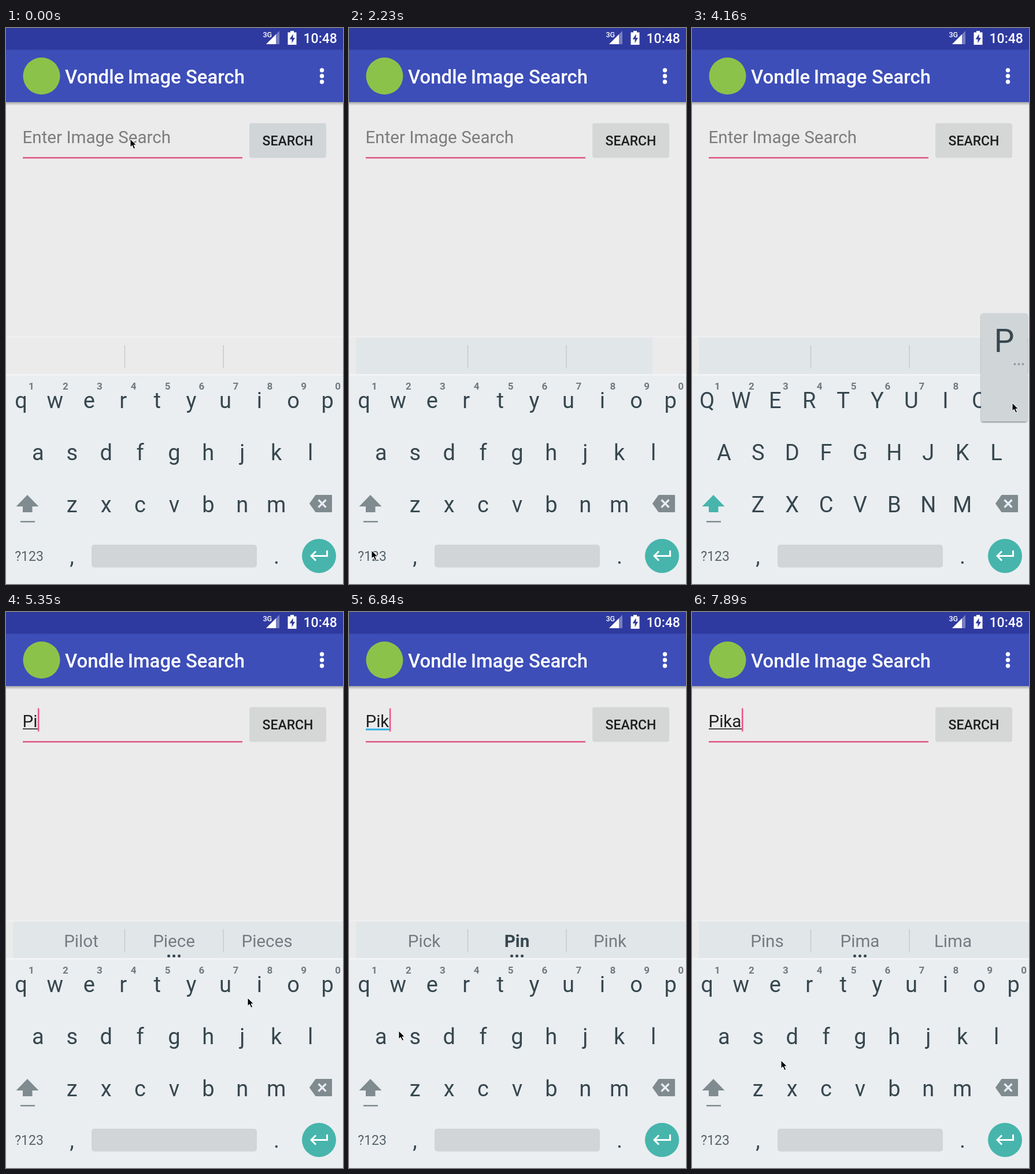
Animation, 583 px wide and 961 px high, one loop 8000 ms. Source, as an HTML page:

```html
<!DOCTYPE html>
<html lang="en">
<head>
<meta charset="utf-8">
<title>Image search</title>
<style>
  html, body { margin: 0; width: 100%; height: 100%; overflow: hidden; background: #ebebeb; }
  svg { display: block; width: 100vw; height: 100vh; font-family: Roboto, sans-serif; }
  .mid { text-anchor: middle; }
  .med { font-weight: 500; }
  .key { font-size: 38px; fill: #37474f; text-anchor: middle; }
  .hint { font-size: 17px; font-weight: 700; fill: #70797e; text-anchor: middle; }
  .word { font-size: 29.6px; fill: #737d82; text-anchor: middle; }
  .bold { font-weight: 700; fill: #37474f; }
</style>
</head>
<body>
<svg viewBox="0 0 583 961" xmlns="http://www.w3.org/2000/svg">
  <defs>
    <linearGradient id="fade" x2="0" y2="1">
      <stop stop-color="#000" stop-opacity=".3"/>
      <stop offset="1" stop-color="#000" stop-opacity="0"/>
    </linearGradient>
    <filter id="soft" x="-10%" y="-10%" width="120%" height="120%">
      <feDropShadow dx="0" dy="1.5" stdDeviation="1.3" flood-opacity=".45"/>
    </filter>
  </defs>
  <rect width="583" height="961" fill="#ebebeb"/>

  <!-- status and app bars -->
  <rect y="128" width="583" height="6" fill="url(#fade)"/>
  <rect width="583" height="128" fill="#3d4eb8"/>
  <rect width="583" height="37.5" fill="#2f3aa0"/>
  <g fill="#fff">
    <text class="med" x="444.5" y="16" font-size="12.5">3G</text>
    <path d="M473 5V28H450Z" opacity=".35"/>
    <path d="M467 11V28H450Z"/>
    <path d="M492 5h6v2.5h4.5V29h-15V7.500h4.500Z"/>
    <path d="M496.500 10.500L490.500 19.500H494.500V26L500 17H496.500Z" fill="#2f3aa0"/>
    <text class="med" x="514.500" y="26" font-size="23">10:48</text>
    <text class="med" x="102" y="96" font-size="32.900">Vondle</text>
    <text class="med" x="413" y="96" font-size="32.900" text-anchor="end">Image Search</text>
    <circle cx="546.500" cy="73" r="3.700"/>
    <circle cx="546.500" cy="83" r="3.700"/>
    <circle cx="546.500" cy="93" r="3.700"/>
  </g>
  <circle cx="61.500" cy="83" r="32" fill="#8bc34a"/>

  <!-- search form -->
  <text id="hint" x="28.500" y="199" font-size="29.600" fill="#7c7c7c">Enter Image Search</text>
  <text id="typed" x="28.500" y="199" font-size="29.600" fill="#202020"></text>
  <rect id="under" x="29"/>
  <rect id="caret" y="166.500" width="2.500" height="40" fill="#f0508a"/>
  <rect x="29" y="223" width="380" height="2.600" fill="#df5a87"/>
  <rect id="button" x="421" y="164.500" width="133" height="60" rx="4"/>
  <text class="mid med" x="487.500" y="203" font-size="23" fill="#1c1d1d">SEARCH</text>

  <!-- suggestions -->
  <rect id="strip" x="12" y="535" height="64" fill="#e1e6e9"/>
  <rect y="533" width="583" height="2" fill="#f0f0f0"/>
  <path d="M205.500 548V587M376 548V587" stroke="#c6cacc" stroke-width="1.500"/>
  <g id="words">
    <text class="word" x="130" y="579"></text>
    <text class="word" x="290.500" y="579"></text>
    <text class="word" x="451.500" y="579"></text>
    <path d="M281.500 594.500h.01m9 0h.01m9 0h.01" stroke="#37474f" stroke-width="5" stroke-linecap="round"/>
  </g>

  <!-- keyboard -->
  <rect y="599" width="583" height="362" fill="#eaeef1"/>
  <rect y="598.500" width="583" height="2" fill="#f6f8f9"/>
  <g id="keys"></g>
  <path id="shift" d="M37 807L56.500 827H45.500V837H29V827H17.500Z"/>
  <rect x="25" y="852" width="25" height="2.500" fill="#7f8b8f"/>
  <path d="M526 822L536 808H563V836H536Z" fill="#7f8b8f" stroke="#7f8b8f" stroke-width="2" stroke-linejoin="round"/>
  <path d="M540.500 815.500l13 13m0-13l-13 13" stroke="#eaeef1" stroke-width="3.200"/>
  <text class="mid" x="40" y="921" font-size="23" fill="#57646a">?123</text>
  <text class="key" x="114" y="926">,</text>
  <text class="key" x="468" y="926">.</text>
  <rect x="148" y="893" width="286" height="39.500" rx="5" fill="#d1d5d8"/>
  <circle cx="541.500" cy="912.500" r="29.500" fill="#47b5ac"/>
  <path d="M555.500 903V912.500H529M536 904.500L528 912.500L536 920.500" fill="none" stroke="#fff" stroke-width="3"/>

  <g id="popup">
    <rect x="-40" y="493" width="80" height="187" rx="4" fill="#d0d5d8" filter="url(#soft)"/>
    <text class="mid" y="560" font-size="55" fill="#37474f"></text>
    <path d="M18.500 581h.01m7 0h.01m7 0h.01" stroke="#929b9f" stroke-width="4" stroke-linecap="round"/>
  </g>
  <path id="mouse" d="M0 0V14L3.300 11L6 17L8.600 16L6 10.200H10.500Z" fill="#000" stroke="#fff" stroke-width="1"/>
</svg>
<script>
const $ = id => document.getElementById(id);
const LOOP = 8000, TICK = 148.4;

// Pointer stops: tick, x, y
const stops = [
  [5, 215, 192], [13, 38, 886], [15, 39, 903], [16, 39, 903], [19, 34, 808], [21, 34, 806],
  [26, 555, 650], [28, 554, 648], [29, 554, 648], [32, 419, 666], [36, 418, 667],
  [41, 453, 738], [44, 453, 738], [46, 86, 724], [50, 48, 742], [51, 48, 742], [53, 154, 775]
];
// Key presses: from tick, to tick, letter, centre, vertical offset, has more letters
const presses = [
  [28, 29, "P", 540, 0, true], [34, 35, "i", 438, 0, true],
  [42, 43, "k", 468, 90, false], [50, 52, "a", 55, 90, true]
];
// Text changes: tick, text
const edits = [[0, ""], [29, "P"], [35, "Pi"], [43, "Pik"], [51, "Pika"]];
const offers = [[0, ""], [35, "Pilot Piece Pieces"], [43, "Pick Pin Pink"], [52, "Pins Pima Lima"]];
const stripEnds = [[0, 12], [10, 525], [21, 568], [28, 583]];

const latest = (list, n) => list.filter(e => e[0] <= n).pop();
const set = (el, attrs) => { for (const k in attrs) el.setAttribute(k, attrs[k]); };

function addText(cls, x, y, text) {
  const el = document.createElementNS("http://www.w3.org/2000/svg", "text");
  set(el, { class: cls, x, y });
  el.textContent = text;
  $("keys").append(el);
  return el;
}

const letters = [];
[["qwertyuiop", 26], ["asdfghjkl", 55.3], ["zxcvbnm", 114.2]].forEach(([row, x0], r) =>
  [...row].forEach((c, i) => {
    const x = x0 + 58.9 * i;
    letters.push([addText("key", x, 656.5 + 90 * r, c), c]);
    if (!r) addText("hint", x + 18, 624.5, (i + 1) % 10);
  }));

function pointer(n) {
  const i = stops.findIndex(s => s[0] > n);
  if (i === 0) return stops[0].slice(1);
  if (i < 0) return stops[stops.length - 1].slice(1);
  const [a, x, y] = stops[i - 1], [b, x2, y2] = stops[i];
  const p = (n - a) / (b - a), e = p * p * (3 - 2 * p);
  return [x + (x2 - x) * e, y + (y2 - y) * e];
}

function draw(n) {
  const [since, text] = latest(edits, n);
  $("typed").textContent = text;
  $("hint").style.display = text ? "none" : "";
  const width = text ? $("typed").getComputedTextLength() : 0;

  const blue = n >= 43 && n < 52;
  set($("under"), { width, y: blue ? 201.5 : 201.3, height: blue ? 3 : 1.6, fill: blue ? "#2fb0e0" : "#202020" });

  const age = text ? (n - since) * 148.7 : n * 148.7 - 590;
  set($("caret"), { x: 29 + width, opacity: age >= 0 && age % 1000 < 500 ? 1 : 0 });

  set($("button"), { fill: n < 10 ? "#d0d5d8" : "#d5d7d7" });
  set($("strip"), { width: latest(stripEnds, n)[1] - 12 });

  const words = latest(offers, n)[1].split(" ");
  $("words").style.display = words[0] ? "" : "none";
  [...$("words").querySelectorAll("text")].forEach((el, i) => {
    el.textContent = words[i] || "";
    el.classList.toggle("bold", blue && i === 1);
  });

  const caps = n >= 21 && n < 29;
  for (const [el, c] of letters) el.textContent = caps ? c.toUpperCase() : c;
  set($("shift"), { fill: caps ? "#47b5ac" : "#7f8b8f" });

  const press = presses.find(p => n >= p[0] && n < p[1]);
  $("popup").style.display = press ? "" : "none";
  if (press) {
    const [, , c, x, y, more] = press;
    set($("popup"), { transform: `translate(${x} ${y})` });
    $("popup").querySelector("text").textContent = c;
    $("popup").querySelector("path").style.display = more ? "" : "none";
  }
  set($("mouse"), { transform: `translate(${pointer(n)})` });
}

const start = performance.now();
function frame(now) {
  draw(Math.floor(Math.max(0, now - start) % LOOP / TICK));
  requestAnimationFrame(frame);
}
frame(start);
</script>
</body>
</html>
```
